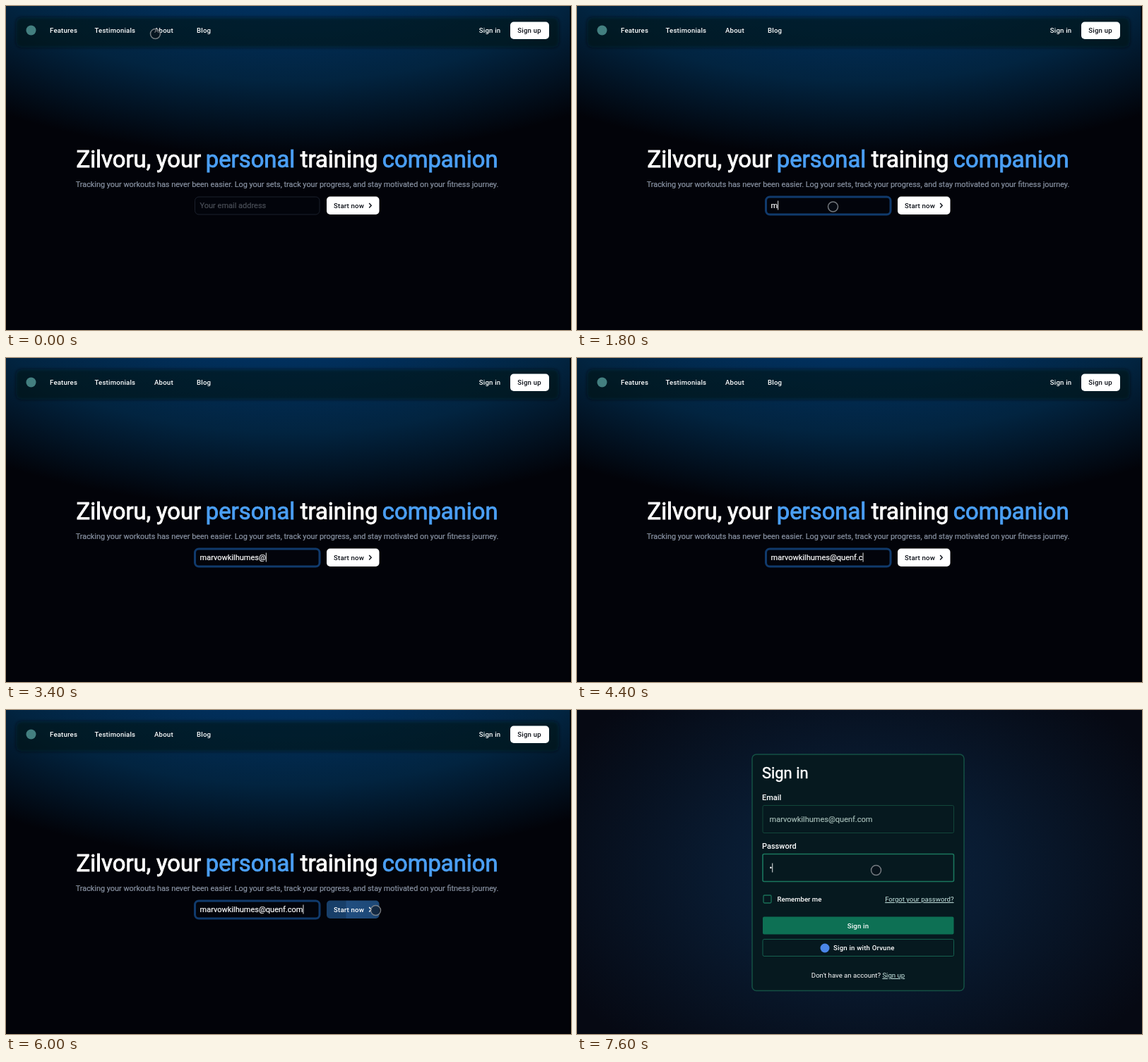
An HTML page that plays this animation: 800 px wide and 460 px high, repeating every 8 s.

```html
<!DOCTYPE html>
<html lang="en">
<head>
<meta charset="utf-8">
<title>Sign-in walkthrough</title>
<style>
  html, body { margin: 0; width: 100%; height: 100%; overflow: hidden; background: #020309; }
  svg { display: block; width: 800px; height: 460px; font-family: Roboto, sans-serif; fill: #fff; }
  .label { font-size: 9.6px; font-weight: 500; letter-spacing: .2px; }
  .small { font-size: 9.6px; }
  .field { font-size: 11px; }
  .value { stroke-width: .2; }
  .link { fill: #c9e8e4; text-decoration: underline; }
  .box { fill: none; stroke: #12463a; }
</style>
</head>
<body>
<svg viewBox="0 0 800 460">
  <defs>
    <radialGradient id="sky" gradientUnits="userSpaceOnUse" r="1" cx="0" cy="0" gradientTransform="translate(400 -92) scale(680 305)">
      <stop stop-color="#003a77"/><stop offset=".65" stop-color="#022440"/><stop offset="1" stop-color="#020309"/>
    </radialGradient>
    <radialGradient id="night" gradientUnits="userSpaceOnUse" r="1" cx="0" cy="0" gradientTransform="translate(400 230) scale(480 330)">
      <stop stop-color="#0b2340"/><stop offset=".4" stop-color="#091b31"/><stop offset="1" stop-color="#060913"/>
    </radialGradient>
    <linearGradient id="hover">
      <stop offset=".36" stop-color="#183f69"/><stop offset=".38" stop-color="#214e80"/><stop offset="1" stop-color="#1d4876"/>
    </linearGradient>
    <filter id="soft"><feGaussianBlur stdDeviation="2"/></filter>
  </defs>

  <g id="home">
    <rect width="800" height="460" fill="url(#sky)"/>
    <rect x="798.5" width="1.5" height="460" fill="#000"/>
    <rect x="14" y="16" width="769" height="43" rx="8" fill="#060f1a" fill-opacity=".6" filter="url(#soft)"/>
    <circle cx="35.5" cy="34.5" r="7" fill="#437f80"/>
    <g class="label">
      <text x="62" y="38">Features</text>
      <text x="125.5" y="38">Testimonials</text>
      <text x="210" y="38">About</text>
      <text x="270" y="38">Blog</text>
      <text x="669.8" y="38">Sign in</text>
      <rect x="714" y="22.5" width="55" height="24.5" rx="5"/>
      <text x="724.3" y="38" fill="#080c14">Sign up</text>
    </g>
    <g font-size="32.8" stroke-width=".9">
      <g stroke="#fff">
        <text x="99.5" y="229">Zilvoru,</text>
        <text x="213" y="229">your</text>
        <text x="416.8" y="229">training</text>
      </g>
      <g fill="#4b9ff5" stroke="#4b9ff5">
        <text x="282.8" y="229">personal</text>
        <text x="532.8" y="229">companion</text>
      </g>
    </g>
    <text x="398" y="257" font-size="10.86" fill="#8b95a5" stroke="#8b95a5" stroke-width=".2" text-anchor="middle">Tracking your workouts has never been easier. Log your sets, track your progress, and stay motivated on your fitness journey.</text>
    <rect id="emailBox" x="267.5" y="271" width="176.5" height="25" rx="5.5" fill="#02040b"/>
    <text id="email" class="field value" x="274.5" y="286.5"></text>
    <path id="emailCaret" stroke="#fff" stroke-width=".9"/>
    <rect id="start" x="454" y="270.5" width="74.5" height="25.5" rx="5"/>
    <g id="startLabel">
      <text class="label" x="464" y="286.5">Start now</text>
      <path d="M514.2 280l3 3.2l-3 3.2" fill="none" stroke="currentColor" stroke-width="1.4"/>
    </g>
  </g>

  <g id="login">
    <rect width="800" height="460" fill="url(#night)"/>
    <rect x="248" y="63" width="300" height="335.5" rx="6" fill="#06191f" stroke="#145044" stroke-width="1.5"/>
    <text x="262" y="97" font-size="21.9" stroke="#fff" stroke-width=".5">Sign in</text>
    <g class="field">
      <text x="262" y="127.5" font-weight="500">Email</text>
      <text x="262" y="196.5" font-weight="500">Password</text>
      <rect class="box" x="263" y="135.5" width="270.5" height="39" rx="2"/>
      <text id="sentEmail" class="value" x="272.5" y="158.5" fill="#a3bbb5" stroke="#a3bbb5"></text>
      <rect id="passBox" class="box" x="263" y="204.5" width="270.5" height="39" rx="2"/>
      <text id="pass" class="value" x="272.5" y="228"></text>
      <path id="passCaret" stroke="#fff" stroke-width=".9"/>
    </g>
    <rect x="264" y="263" width="11" height="11" rx="1.5" fill="none" stroke="#1a7058" stroke-width="1.3"/>
    <g class="small">
      <text x="283.5" y="272" font-weight="500">Remember me</text>
      <text class="link" x="533.5" y="272" text-anchor="end">Forgot your password?</text>
      <text x="398" y="380" text-anchor="middle">Don't have an account? <tspan class="link">Sign up</tspan></text>
    </g>
    <rect x="263" y="293.5" width="270.5" height="25" rx="2" fill="#0d7054"/>
    <rect class="box" x="263" y="325.5" width="270.5" height="24" rx="2" style="stroke:#15604e"/>
    <g class="label">
      <text x="398" y="309.5" text-anchor="middle">Sign in</text>
      <circle cx="351" cy="338" r="6.5" fill="#4a86e8"/>
      <text x="363" y="341">Sign in with Orvune</text>
    </g>
  </g>

  <circle id="pointer" r="7" fill="#0a0f17" fill-opacity=".55" stroke="#888d92" stroke-opacity=".85" stroke-width="1.5"/>
</svg>
<script>
  const LOOP = 8000, STEP = 200;
  const address = 'marvowkilhumes@quenf.com';
  const typing = [[1600, 0], [1800, 1], [2400, 6], [3400, 15], [4400, 22], [4800, 24]];
  const moves = [ // start, end, from, to
    [0, 1000, [211.5, 39.5], [362.5, 285]],
    [5200, 5800, [362.5, 285], [523.5, 284.5]],
    [6200, 7000, [523.5, 284.5], [423.5, 227.5]]
  ];
  const $ = id => document.getElementById(id);
  const set = (id, attrs) => { for (const k in attrs) $(id).setAttribute(k, attrs[k]); };
  const show = (id, on) => { $(id).style.display = on ? '' : 'none'; };
  const clamp = v => Math.min(1, Math.max(0, v));
  const ease = p => p * p * (3 - 2 * p);

  function typedCount(t) {
    let n = 0;
    for (let i = 1; i < typing.length; i++) {
      const [t0, a] = typing[i - 1], [t1, b] = typing[i];
      n += (b - a) * clamp((t - t0) / (t1 - t0));
    }
    return Math.floor(n + 0.01);
  }

  function pointerAt(t) {
    const [start, end, from, to] = moves.filter(m => m[0] <= t).pop();
    const p = ease(clamp((t - start) / (end - start)));
    return from.map((v, i) => v + (to[i] - v) * p);
  }

  // Fills a field and returns the width of the typed value.
  function field(id, value, placeholder, dim) {
    const color = value ? '#fff' : dim;
    $(id).textContent = value || placeholder;
    set(id, { fill: color, stroke: color });
    return value ? $(id).getComputedTextLength() : 0;
  }

  function draw(t) {
    const onLogin = t >= 6200;
    const [x, y] = pointerAt(t);
    show('home', !onLogin);
    show('login', onLogin);
    show('pointer', t < 2200 || t >= 5200);
    set('pointer', { cx: x, cy: y });

    if (onLogin) {
      const focused = t >= 7200;
      const width = field('pass', t >= 7600 ? '•' : '', '••••••', '#465b5e');
      show('passCaret', focused);
      set('passCaret', { d: `M${273 + width} 217.5v13` });
      $('passBox').style.stroke = focused ? '#1a765d' : '';
      $('passBox').style.strokeWidth = focused ? 1.6 : 1;
    } else {
      const focused = t >= 1200, hovered = t >= 5200 && x > 454;
      const width = field('email', address.slice(0, typedCount(t)), 'Your email address', '#4a4f58');
      const ink = hovered ? '#fff' : '#080c14';
      show('emailCaret', focused);
      set('emailCaret', { d: `M${275 + width} 276.5v13` });
      set('emailBox', { stroke: focused ? '#103a6c' : '#1b212d', 'stroke-width': focused ? 3 : 1 });
      set('start', { fill: hovered ? 'url(#hover)' : '#fff' });
      set('startLabel', { fill: ink, color: ink });
    }
  }

  $('sentEmail').textContent = address;
  function tick() {
    draw(Math.floor(performance.now() % LOOP / STEP) * STEP);
    requestAnimationFrame(tick);
  }
  tick();
</script>
</body>
</html>
```
